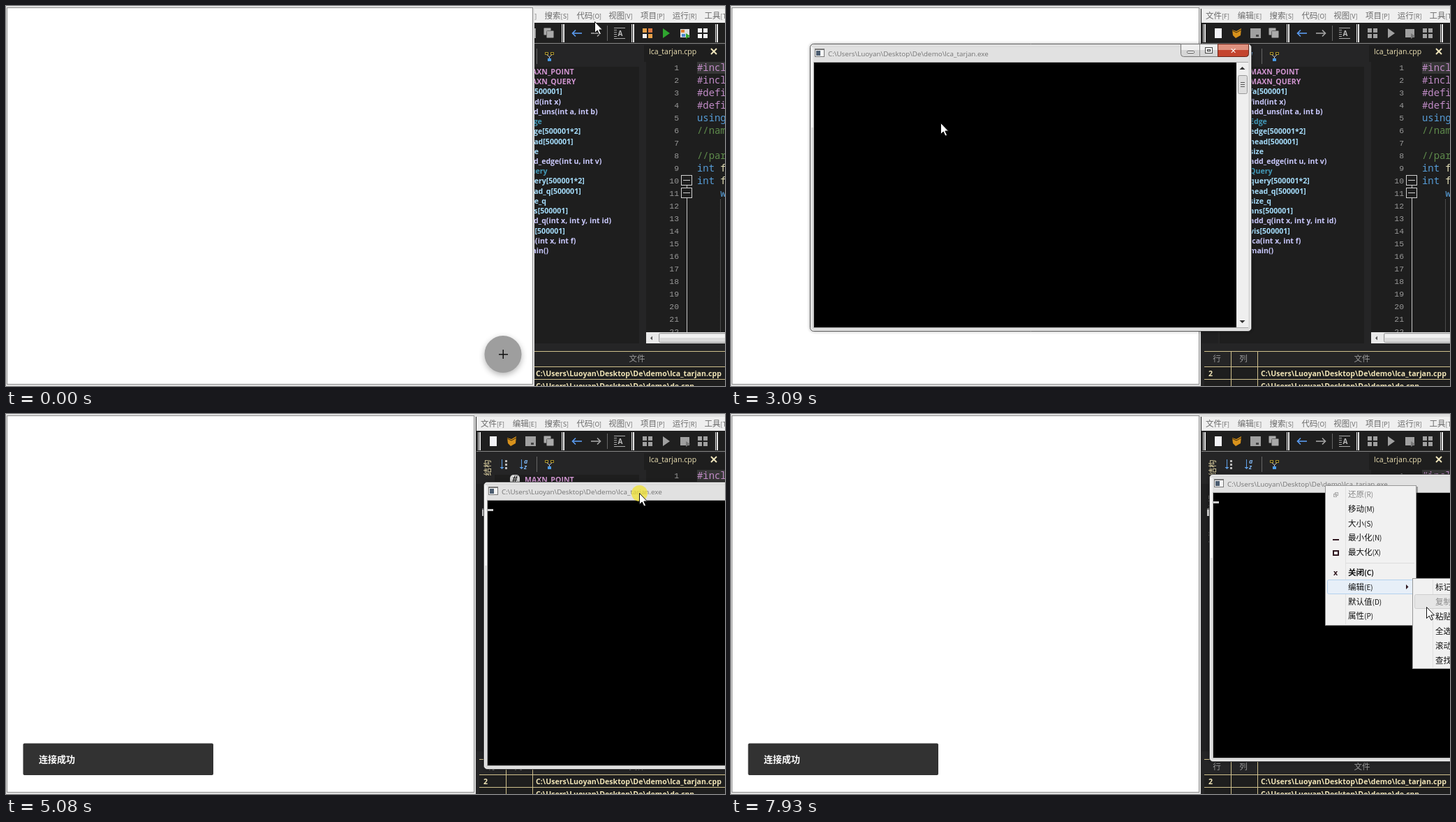
Recreate the animation shown at these times as an HTML page with a canvas. Size 1030 px wide and 544 px high, loop 8 s.

```html
<!DOCTYPE html>
<html lang="zh">
<head>
<meta charset="utf-8">
<title>Console demo</title>
<style>
html, body { margin: 0; width: 100%; height: 100%; overflow: hidden; background: #fff; }
canvas { display: block; }
</style>
</head>
<body>
<canvas id="stage" width="1030" height="544"></canvas>
<script>
const LOOP = 8000, STEP = 70;
const c = document.getElementById('stage').getContext('2d');
const UI = "'Open Sans', 'Noto Sans', sans-serif";
const CJK = "'Noto Sans CJK SC', 'Noto Sans CJK', sans-serif";
const MONO = "'Noto Sans Mono', 'DejaVu Sans Mono', monospace";
const BOLD = `bold 10.6px ${UI}`;
const HOME = 'C:\\Users\\Luoyan\\Desktop\\De\\demo\\';

// Drawing helpers
function box(x, y, w, h, fill) { c.fillStyle = fill; c.fillRect(x, y, w, h); }
function frame(x, y, w, h, color) {
  c.strokeStyle = color; c.lineWidth = 1;
  c.strokeRect(x + .5, y + .5, w - 1, h - 1);
}
function path(...points) {
  points.forEach((v, i) => { if (i % 2) c[i > 1 ? 'lineTo' : 'moveTo'](points[i - 1], v); });
}
function shape(fill, ...points) {
  c.beginPath(); path(...points); c.fillStyle = fill; c.fill();
}
function line(color, width, ...points) {
  c.beginPath(); path(...points);
  c.strokeStyle = color; c.lineWidth = width; c.stroke();
}
// Small triangle pointing along (dx, dy)
function tip(x, y, dx, dy, color, r = 4) {
  shape(color, x + dx * r, y + dy * r, x - dy * r, y + dx * r, x + dy * r, y - dx * r);
}
function disc(x, y, r, fill) {
  c.beginPath(); c.arc(x, y, r, 0, 7); c.fillStyle = fill; c.fill();
}
function round(x, y, w, h, r, fill, stroke) {
  c.beginPath(); c.roundRect(x, y, w, h, r);
  if (fill) { c.fillStyle = fill; c.fill(); }
  if (stroke) { c.lineWidth = 1; c.strokeStyle = stroke; c.stroke(); }
}
function text(s, x, y, color, font, align = 'left') {
  c.font = font; c.fillStyle = color; c.textAlign = align;
  c.fillText(s, x, y);
}
// Chinese label followed by a smaller shortcut key
function label(s, x, y, color, small, weight = '') {
  const cut = s.search(/[[(]/);
  text(s.slice(0, cut), x, y, color, `${weight} 11.5px ${CJK}`);
  const w = c.measureText(s.slice(0, cut)).width;
  text(s.slice(cut), x + w, y, color, `${weight} ${small}px ${CJK}`);
}
function upright(s, y, color) {
  c.save(); c.translate(690, y); c.rotate(-Math.PI / 2);
  text(s, 0, 4, color, `11.5px ${CJK}`, 'center');
  c.restore();
}

// Motion is held for short ticks within each burst
const bursts = [0, 70, 290, 970, 1710, 3090, 3520, 4160, 5000, 5550, 6090, 6240, 7110, 7310];
function tick(t) {
  const s = bursts.filter(b => b <= t).pop();
  return s + Math.floor((t - s) / STEP) * STEP;
}
// Each move: begin, end, x, y
function follow(moves, t) {
  let x = 0, y = 0;
  for (const [a, b, tx, ty] of moves) {
    if (t < a) break;
    const p = Math.min(1, (t - a + STEP) / (b - a + STEP));
    x += (tx - x) * p; y += (ty - y) * p;
  }
  return [Math.round(x), Math.round(y)];
}
const windowMoves = [[0, 0, 113, 54], [4160, 4440, 466, 99], [4510, 4600, 684, 106],
  [5000, 5070, 684, 97], [5210, 5350, 685, 86]];
const pointerMoves = [[0, 0, 843, 22], [70, 70, 954, 5], [290, 780, 999, 42], [970, 1320, 972, 43],
  [1710, 1920, 933, 60], [3090, 3090, 300, 167], [3520, 3940, 336, 70], [5000, 5350, 908, 102],
  [5550, 5760, 851, 102], [6240, 6660, 887, 170], [6730, 7010, 930, 262],
  [7110, 7110, 930, 254], [7310, 7870, 996, 276]];
function pointerAt(k) {
  if (k < 4160 || k >= 5550) return follow(pointerMoves, k);
  const [x, y] = follow(windowMoves, k + STEP); // the dragged window lags one tick
  return [x + 223, y + 16];
}

function browser() {
  box(0, 0, 757, 544, '#e2e2e2');
  box(1, 2, 754, 540, '#8c8c8c');
  box(2, 3, 752, 538, '#fff');
  c.save();
  c.shadowColor = 'rgba(0,0,0,.3)'; c.shadowBlur = 9; c.shadowOffsetY = 3;
  disc(712, 498.5, 26.5, '#9e9e9e');
  c.restore();
  box(706, 498, 13, 1.5, '#111');
  box(711.5, 492, 1.5, 13, '#111');
}

function grid(x, colors) {
  colors.forEach((k, i) => box(x + i % 2 * 8, 32 + (i >> 1) * 8, 6, 6, k));
}
function arrow(x, dir, color) {
  line(color, 1.6, x - 7 * dir, 39, x + 6 * dir, 39);
  line(color, 1.6, x + 2 * dir, 34.5, x + 6.5 * dir, 39, x + 2 * dir, 43.5);
}
function grip(x) { box(x, 26, 1, 26, '#e8e8e8'); box(x + 2, 26, 2, 26, '#e8e8e8'); }

function toolbar(busy) {
  const g = '#a0a0a0';
  box(674, 24, 356, 30, '#1f1f1f');
  box(674, 53, 356, 1, '#858585');
  [676, 796, 896, 1016].forEach(grip);
  box(861, 28, 1, 22, '#666');
  box(693, 32, 10, 14, '#f2f2f6');
  shape('#d8921c', 718, 34, 724, 36, 731, 32, 730, 42, 723, 46, 719, 42);
  line('#3b2a0a', 1, 718, 35, 724, 38, 731, 34);
  box(744, 32, 15, 14, g); box(752, 41, 4, 3, '#444');
  [0, 4].forEach(d => round(770.5 + d, 31.5 + d, 10, 10, 1, '#aaa', '#666'));
  arrow(818, -1, '#5b9cf0');
  arrow(845, 1, '#a5a5a5');
  for (let i = 0; i < 6; i++) box(871, 31 + i * 3, i % 5 ? 4 : 16, 1, '#aaa');
  text('A', 880, 43, '#bbb', `bold 10px ${UI}`, 'center');
  grid(912, busy ? [g, g, g, g] : ['#e6a04a', '#dc7840', '#f0f0f0', '#e6a04a']);
  shape(busy ? g : '#2fa62f', 941, 32, 951, 39, 941, 46);
  box(966, 33, 13, 12, busy ? g : '#ddd');
  if (!busy) { box(967, 34, 5, 4, '#e08030'); box(968, 40, 5, 4, '#4a88d0'); }
  shape(busy ? '#777' : '#2fa62f', 974, 39, 980, 43, 974, 47);
  grid(991, Array(4).fill(busy ? g : '#f4f4f4'));
}

const symbols = ['#MAXN_POINT', '#MAXN_QUERY', 'gfa[500001]', 'ffind(int x)', 'fadd_uns(int a, int b)',
  'CEdge', 'gedge[500001*2]', 'ghead[500001]', 'gsize', 'fadd_edge(int u, int v)', 'CQuery',
  'gquery[500001*2]', 'ghead_q[500001]', 'gsize_q', 'gans[500001]', 'fadd_q(int x, int y, int id)',
  'gvis[500001]', 'flca(int x, int f)', 'fmain()'];
const kinds = { '#': ['#d5d5d5', '#cf94cf'], g: ['#fff36b', '#a5dcfa'],
  f: ['#85f2fa', '#c9c8fb'], C: ['#1590e8', '#4299b8'] };

function sortIcon(x) {
  line('#5f9fe6', 1, x + .5, 65, x + .5, 78);
  tip(x + .5, 76, 0, 1, '#5f9fe6', 3);
}
function sidebar() {
  box(700, 87, 207, 396, '#1e1e1e');
  box(674, 100, 24, 383, '#202021');
  ['结构', '监视', '文件'].forEach((s, i) => upright(s, 77 + i * 50, i ? '#7d7d7d' : '#e6d9a8'));
  box(682, 135, 11, 11, '#d6d6d6'); box(682, 135, 11, 2, '#777');
  sortIcon(710); sortIcon(738);
  [66, 71, 76].forEach(y => box(715, y, 3, 3, '#bbb'));
  text('a', 742, 71, '#7fb4f0', `italic bold 9px ${UI}`);
  text('z', 742, 79, '#7fb4f0', `italic bold 9px ${UI}`);
  box(760, 61, 1, 22, '#666');
  line('#ccc', 1, 774, 69, 778.5, 73, 783, 69);
  line('#ccc', 1, 778.5, 73, 778.5, 77);
  [[772, 66], [780, 66], [776, 75]].forEach(([x, y], i) => {
    box(x, y, 5, 4, i < 2 ? '#141414' : '#4a9be8');
    frame(x, y, 5, 4, i < 2 ? '#a58f2a' : '#4a9be8');
  });
  symbols.forEach((s, i) => {
    const y = 94 + i * 14.22, [icon, ink] = kinds[s[0]];
    round(722, y - 7, 14, 14, 5, icon);
    text(s[0], 729, y + 4, '#101010', `italic bold 14px 'Liberation Serif', serif`, 'center');
    text(s.slice(1), 743, y + 4, ink, BOLD);
    if (s[0] == 'C') {
      const py = Math.round(y) - 6;
      box(705, py, 9, 9, '#f0f0f0'); box(707, py + 4, 5, 1, '#333'); box(709, py + 2, 1, 5, '#333');
    }
  });
}

const code = ['#incl', '#incl', '#defi', '#defi', 'using', '//nam', '', '//par', 'int f', 'int f', '    w'];
const inks = { '#': '#c08bc6', '/': '#5f8c4c' };
function editor() {
  box(914, 56, 116, 24, '#1e1e1e');
  box(917, 79, 113, 388, '#1e1e1e');
  text('lca_tarjan.cpp', 921, 69, '#eee2b4', `10.6px ${UI}`);
  line('#f0e6bc', 2, 1010, 61, 1018, 69);
  line('#f0e6bc', 2, 1018, 61, 1010, 69);
  c.save();
  c.beginPath(); c.rect(917, 79, 113, 388); c.clip();
  box(990, 80, 40, 17, '#363636');
  for (let i = 0; i < 22; i++) {
    const y = 92 + i * 18, s = code[i] || '', font = `13.9px ${MONO}`;
    text(i + 1, 964, y, '#999', "11.4px 'Liberation Mono', monospace", 'right');
    const [, word, name] = s.match(/^(int )?(.*)$/);
    const at = word ? (text(word, 990, y + 1, '#569cd6', font), 990 + c.measureText(word).width) : 990;
    text(name, at, y + 1, word ? '#e4dfb8' : inks[s[0]] || '#569cd6', font);
  }
  box(975, 257, 1, 210, '#c8c8c8');
  [242, 260].forEach(y => {
    box(967, y, 16, 15, '#1e1e1e'); frame(967, y, 16, 15, '#d0d0d0'); box(970, y + 7, 10, 1, '#d0d0d0');
  });
  for (let y = 277; y < 467; y += 2) box(1023, y, 1, 1, '#777');
  c.restore();
  box(917, 467, 113, 16, '#eaeaea');
  tip(926, 475.5, -1, 0, '#555', 3);
  round(935.5, 468.5, 120, 13, 2, '#dadada', '#9b9b9b');
  box(937, 470, 93, 5, '#f2f2f2');
}

function results() {
  const rule = '#cfc08d', ink = '#f0e4b6';
  box(678, 517, 352, 27, '#1e1e1e');
  [494, 516, 534].forEach(y => box(678, y, 352, 1, rule));
  [716, 754].forEach(x => box(x, 494, 1, 50, rule));
  [['行', 696], ['列', 734], ['文件', 904]].forEach(([s, x]) =>
    text(s, x, 509, '#999', `11.5px ${CJK}`, 'center'));
  text('2', 684, 530, ink, BOLD);
  text(HOME + 'lca_tarjan.cpp', 759, 530, ink, BOLD);
  text(HOME + 'de.cpp', 759, 548, ink, BOLD);
}

const menus = ['文件[F]', '编辑[E]', '搜索[S]', '代码[O]', '视图[V]', '项目[P]', '运行[R]', '工具[T]'];
function ide(busy) {
  box(670, 0, 360, 544, '#dedede');
  box(670, 2, 1, 540, '#8c8c8c');
  box(673, 4, 357, 540, '#252526');
  box(674, 4, 356, 20, '#efefef');
  menus.forEach((s, i) => label(s, 680 + 45.8 * i, 18, '#6a6a6a', 9));
  toolbar(busy);
  sidebar();
  editor();
  results();
}

// Half-faded, tilted console while it opens
function openingConsole() {
  const faint = 'rgba(120,120,120,.4)', client = [135, 86, 709, 86, 694, 433, 152, 433];
  c.beginPath();
  path(129, 60, 730, 61, 713, 438, 148, 438); c.closePath();
  c.strokeStyle = faint; c.lineWidth = 1; c.stroke();
  path(...client); c.closePath();
  c.fillStyle = 'rgba(232,232,232,.25)'; c.fill('evenodd');
  shape('rgba(0,0,0,.23)', ...client);
  box(137, 69, 11, 9, faint);
  box(139, 71, 5, 6, '#f4f4f4');
  text('C:\\Program Files (x86)\\Dev-Cpp\\ConsolePauser.exe', 155, 77, 'rgba(90,90,90,.25)', `9.6px ${UI}`);
  round(633.5, 61.5, 92, 17, [0, 0, 3, 3], null, 'rgba(120,120,120,.25)');
  round(641, 70, 10, 3, 1, null, faint);
  frame(665, 66, 10, 8, faint);
  tip(716, 92, 0, -1, '#555', 3);
  tip(702, 427, 0, 1, '#111', 3);
}

function consoleWindow([x, y], caret) {
  c.save();
  c.translate(x, y);
  c.save();
  c.shadowColor = 'rgba(0,0,0,.3)'; c.shadowBlur = 4;
  round(.5, .5, 632, 411, 5, '#e1e1e1', '#555');
  c.restore();
  round(1.5, 1.5, 630, 409, 4, null, '#f8f8f8');
  box(2, 5, 3, 115, '#f2f2f2');
  // Icon, title and buttons
  box(7, 7, 14, 12, '#777'); box(8, 9, 12, 9, '#f5f5f5'); box(9, 10, 6, 7, '#4c5d70');
  text(HOME + 'lca_tarjan.exe', 26, 18, '#747474', `9.85px ${UI}`);
  round(531.5, .5, 97, 18, [0, 0, 4, 4], '#d6d6d6', '#777');
  box(532, 1, 52, 8, '#eee');
  round(584.5, .5, 44, 18, [0, 0, 4, 0], '#c4452f', '#6b2418');
  box(585, 1, 43, 8, '#de917f');
  box(558, 1, 1, 18, '#888');
  round(540.5, 10.5, 10, 3, 1, '#fff', '#555');
  frame(566, 5, 11, 9, '#444'); frame(567, 6, 9, 7, '#fff'); frame(569, 8, 5, 3, '#444');
  text('✕', 606.5, 14, '#fff', "bold 11px 'DejaVu Sans', sans-serif", 'center');
  // Client area and scrollbar
  box(5, 26, 623, 381, '#aaa');
  box(6, 27, 605, 379, '#000');
  box(611, 27, 17, 379, '#efefef');
  tip(619.5, 37, 0, -1, '#333');
  tip(619.5, 396, 0, 1, '#333');
  round(613.5, 45.5, 13, 26, 2, '#dedede', '#999');
  [55, 58, 61].forEach(v => box(617, v, 6, 1, '#555'));
  if (caret) box(6, 39, 8, 3, '#ccc');
  c.restore();
}

function toast(p) {
  const y = 472 + 44 * (1 - Math.min(1, p)) ** 2;
  round(24.5, y - .5, 272.5, 45.5, 2, '#323232');
  text('连接成功', 47, y + 26.5, '#fff', `bold 13px ${CJK}`);
}

const commands = ['还原(R)', '移动(M)', '大小(S)', '最小化(N)', '最大化(X)', '关闭(C)', '编辑(E)', '默认值(D)', '属性(P)'];
const edits = ['标记(K)', '复制(Y)', '粘贴(P)', '全选(S)', '滚动(L)', '查找(F)'];
function panel(x, y, w, h) {
  box(x + 2, y + 2, w, h, 'rgba(0,0,0,.3)');
  box(x, y, w, h, '#f1f1f1');
  frame(x, y, w, h, '#989898');
  box(x + 29, y + 2, 1, h - 4, '#e0e0e0');
}
function item(s, x, y, w, hot, off, weight) {
  if (hot) round(x + 3.5, y - 10.5, w, 20, 2, off ? '#e6e6e6' : '#e7eff8', off ? '#cfcfcf' : '#b4d1ee');
  label(s, x + 33, y + 4, off ? '#8a8a8a' : '#111', 10, weight);
}
function systemMenu(mx, my, sub) {
  const near = y => Math.abs(my - y) <= 10.4, dark = '#301820';
  panel(851, 102, 131, 201);
  commands.forEach((s, i) => {
    const y = 115 + Math.round(i * 20.8) + (i > 4 ? 8 : 0);
    item(s, 851, y, 124, mx > 976 ? i == 6 : i && near(y), !i, i == 5 ? 'bold' : '');
  });
  box(881, 213, 98, 1, '#dcdcdc');
  [0, 2].forEach(d => frame(865 - d, 112 + d, 5, 5, '#aaa'));
  box(862, 179, 9, 2, dark);
  frame(862, 195, 9, 8, dark); frame(863, 196, 7, 6, dark);
  text('x', 866, 231, dark, BOLD, 'center');
  tip(967, 247.5, 1, 0, dark, 3.5);
  if (!sub) return;
  panel(976, 235, 120, 130);
  edits.forEach((s, i) => {
    const y = 248 + i * 21;
    item(s, 976, y, 112, mx > 978 && near(y), i == 1);
  });
}

function pointer(x, y) {
  c.save(); c.translate(x + .5, y + .5);
  c.beginPath();
  path(0, 0, 0, 16, 3.7, 12.5, 6.5, 18.5, 9, 17.5, 6.3, 11.5, 11, 11.5);
  c.closePath();
  c.fillStyle = '#fff'; c.fill();
  c.strokeStyle = '#111'; c.lineWidth = 1; c.stroke();
  c.restore();
}

function draw(t) {
  const k = tick(t), [mx, my] = pointerAt(k);
  if (t < 1710) { ide(false); browser(); }
  else { browser(); ide(t >= 1780); }
  if (k >= 4370) toast((k - 4300) / 350);
  if (t >= 1970 && t < 3090) openingConsole();
  if (t >= 3090) consoleWindow(follow(windowMoves, k), Math.floor((t - 3620) / 530) % 2 == 0);
  if (t >= 6240) systemMenu(mx, my, t >= 7310);
  const pressed = t >= 4160 && t < 5550 || t >= 6090 && t < 6240;
  if (pressed) disc(mx + .5, my + .5, 11.5, 'rgba(240,226,50,.75)');
  pointer(mx, my);
}

const start = performance.now();
function loop() {
  draw((performance.now() - start) % LOOP);
  requestAnimationFrame(loop);
}
loop();
</script>
</body>
</html>
```
